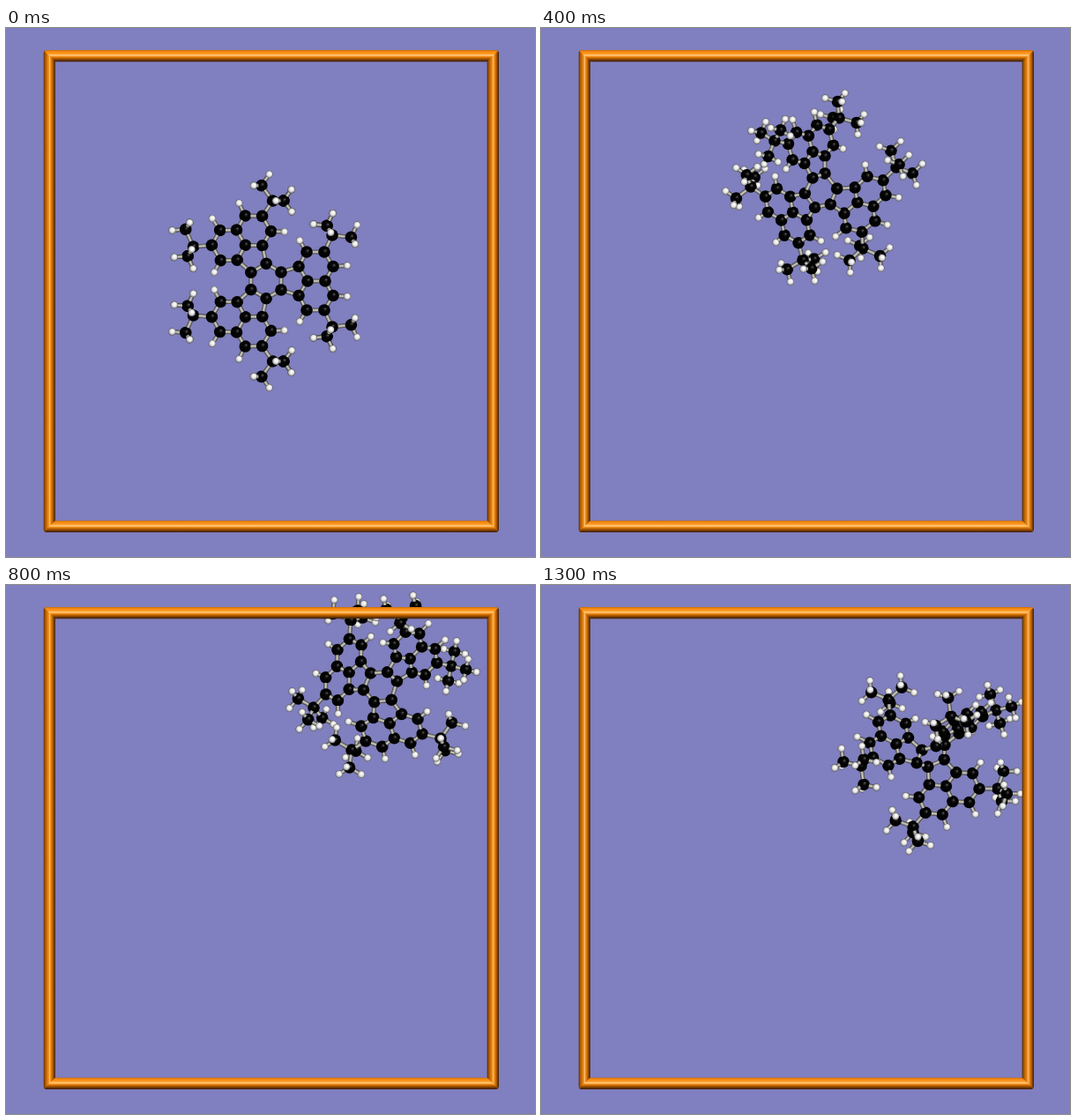
An HTML page with a canvas for the animation above (1.4 s loop, 600 px wide and 600 px high).

```html
<!DOCTYPE html>
<html lang="en">
<head>
<meta charset="utf-8">
<title>Tumbling molecule</title>
<style>
  html, body { margin: 0; width: 100%; height: 100%; overflow: hidden; background: #807fbf; }
  canvas { display: block; width: 100vw; height: 100vh; }
</style>
</head>
<body>
<canvas id="stage" width="600" height="600"></canvas>
<script>
const ctx = document.getElementById('stage').getContext('2d');
const STEP = 100, COUNT = 14;
const TURN = Math.PI * 2 / 3;
const RAD = Math.PI / 180;

// Flat starting pose: three arms around one centre.
function flatPose(cx, cy) {
  const pts = [];
  for (let i = 0; i < 3; i++) {
    const c = Math.cos(i * TURN), s = Math.sin(i * TURN);
    for (const [r, t] of [[17, 0], [75, -52], [75, 52]])
      pts.push(cx + r * c - t * s, cy + r * s + t * c);
  }
  return pts;
}

// Per arm: inner midpoint, then its two outer hubs; spin holds the hub angles.
const poses = [
  { at: 0, pts: flatPose(295, 287), spin: [0, 0, 0, 0, 0, 0] },
  { at: 3, pts: [320,239, 391,222, 315,284, 292,228, 257,298, 237,198, 313,211, 283,139, 364,183],
    spin: [-30, -40, -30, -20, -20, 0] },
  { at: 4, pts: [332,191, 403,158, 365,250, 305,195.5, 297,263, 238,180, 315,167.5, 265,128, 338,102],
    spin: [0, -35, -25, -30, 60, -20] },
  { at: 6, pts: [371.5,129, 440,98, 395,190, 343,130, 330,198, 277,110, 356,103, 304,47, 395,46],
    spin: [-20, -35, -30, -30, 40, 60] },
  { at: 8, pts: [427.5,131.5, 493,174, 392,187, 409.5,109.5, 349,139, 391,40, 438,104, 449,37, 505,92],
    spin: [20, 60, -20, -30, 0, 50] },
  { at: 11, pts: [433,157, 488,207, 386,199, 420,130.5, 353,150, 418,68, 449.5,131.5, 476,66, 517,137],
    spin: [20, 0, -25, -50, 0, 60] },
  { at: 13, pts: [448,202, 518,231, 422,274, 429,194.5, 363,205, 394,130, 453,182, 465,149, 516,142],
    spin: [30, 60, 30, 0, 60, -30] }
];

const add = (a, b, k = 1) => a.map((v, i) => v + b[i] * k);
const dot = (a, b) => a[0] * b[0] + a[1] * b[1] + a[2] * b[2];
const cross = (a, b) => [a[1] * b[2] - a[2] * b[1], a[2] * b[0] - a[0] * b[2], a[0] * b[1] - a[1] * b[0]];
const unit = a => { const l = Math.hypot(...a) || 1; return a.map(v => v / l); };

function poseAt(n) {
  let i = 0;
  while (i < poses.length - 2 && poses[i + 1].at <= n) i++;
  const a = poses[i], b = poses[i + 1], k = (n - a.at) / (b.at - a.at);
  return {
    pts: a.pts.map((v, j) => v + (b.pts[j] - v) * k),
    // the hubs look the same every 120 degrees
    spin: a.spin.map((v, j) => {
      const d = b.spin[j] - v;
      return v + (d - 120 * Math.round(d / 120)) * k;
    })
  };
}

// Turns the three arm points into a projection with depth.
function armAxes(p) {
  const [mx, my, ax, ay, bx, by] = p;
  const u = [((ax + bx) / 2 - mx) / 58, ((ay + by) / 2 - my) / 58, 0];
  const v = [(bx - ax) / 104, (by - ay) / 104, 0];
  const uv = dot(u, v);
  const uz = Math.sqrt(Math.max(0, 1 - dot(u, u)));
  const vz = Math.sqrt(Math.max(0, 1 - dot(v, v)));
  const top = Math.max(uz, vz);
  const low = top > 0.1 ? Math.max(-0.7, Math.min(0.7, -uv / top)) : 0;
  if (uz >= vz) { u[2] = uz; v[2] = low; } else { v[2] = vz; u[2] = low; }
  const w = cross(u, v);
  return ([r, t, h]) => [
    mx + (r - 17) * u[0] + t * v[0] + h * w[0],
    my + (r - 17) * u[1] + t * v[1] + h * w[1],
    r * u[2] + t * v[2] + h * w[2]
  ];
}

function buildMolecule(pose) {
  const atoms = [], bonds = [], cores = [];
  const link = (a, b) => bonds.push([a, b]);

  for (let arm = 0; arm < 3; arm++) {
    const project = armAxes(pose.pts.slice(arm * 6, arm * 6 + 6));
    const atom = (pos, light, from) => {
      const a = { p: project(pos), r: light ? 4.2 : 6.8, stops: light ? LIGHT : DARK };
      atoms.push(a);
      if (from) link(from, a);
      return a;
    };
    const inner = atom([47, 0, 0]), outer = atom([67, 0, 0], false, inner);

    [-1, 1].forEach((s, side) => {
      const core = atom([17, 10 * s, 0]);
      cores.push(core);
      const c1 = atom([37, 16.5 * s, 0], false, core);
      const c2 = atom([46, 33 * s, 0], false, c1);
      const c3 = atom([66, 33 * s, 0], false, c2);
      const c4 = atom([76, 16.5 * s, 0], false, c3);
      link(c1, inner);
      link(c4, outer);
      atom([38, 46 * s, 0], true, c2);
      atom([92, 17.5 * s, 0], true, c4);

      const hubPos = [75, 52 * s, 0], hub = atom(hubPos, false, c3);
      const axis = [0.43, 0.9 * s, 0], flat = [0.9, -0.43 * s, 0];
      for (let m = 0; m < 3; m++) {
        const q = pose.spin[arm * 2 + side] * RAD + m * TURN;
        let d = axis.map(x => x / 3);
        d = add(d, flat, 0.943 * Math.cos(q));
        d = unit(add(d, [0, 0, 1], 0.943 * Math.sin(q)));
        const pos = add(hubPos, d, 21.5), methyl = atom(pos, false, hub);
        const e = unit(add(axis, d, -dot(axis, d))), f = cross(d, e);
        for (let h = 0; h < 3; h++) {
          let end = add(pos, d, 5.2);
          end = add(end, e, 14.5 * Math.cos(h * TURN));
          end = add(end, f, 14.5 * Math.sin(h * TURN));
          atom(end, true, methyl);
        }
      }
    });
  }
  for (let i = 0; i < 6; i++) link(cores[i], cores[(i + 1) % 6]);
  return { atoms, bonds };
}

const DARK = [[0, '#6a6a6a'], [0.16, '#252525'], [0.36, '#050505'], [1, '#000']];
const LIGHT = [[0, '#fff'], [0.45, '#eee'], [0.75, '#bdbdbd'], [1, '#555']];
const ROD = [[4.8, '#3f3f3b'], [3.5, '#85857f'], [1.7, '#c4c4bb']];

function drawAtom({ p: [x, y], r, stops }) {
  const g = ctx.createRadialGradient(x + r * 0.2, y - r * 0.25, 0, x, y, r);
  stops.forEach(([k, c]) => g.addColorStop(k, c));
  ctx.fillStyle = g;
  ctx.beginPath();
  ctx.arc(x, y, r, 0, Math.PI * 2);
  ctx.fill();
}

// The rod shows only between the surfaces of its two balls.
function drawBond(a, b) {
  const dir = unit(add(b.p, a.p, -1));
  const from = add(a.p, dir, a.r * 0.92), to = add(b.p, dir, -b.r * 0.92);
  for (const [width, color] of ROD) {
    ctx.lineWidth = width;
    ctx.strokeStyle = color;
    ctx.beginPath();
    ctx.moveTo(from[0], from[1]);
    ctx.lineTo(to[0], to[1]);
    ctx.stroke();
  }
}

// Box of four lit tubes with mitred corners.
const BOX = { x0: 42.5, y0: 25, x1: 559, y1: 572, w: 13.3 };
const SIDE = [[0, '#4b2400'], [0.12, '#9a5000'], [0.32, '#d87606'], [0.48, '#f79a2c'],
  [0.54, '#ffc880'], [0.6, '#f0901c'], [0.78, '#b86000'], [0.92, '#6a3400'], [1, '#351800']];
const LEVEL = [[0, '#c06a08'], [0.1, '#f08410'], [0.32, '#ff9a20'], [0.46, '#ffd08c'],
  [0.56, '#f48c14'], [0.7, '#b86000'], [0.86, '#6e3800'], [1, '#381a00']];

function tube(stops, gx0, gy0, gx1, gy1, corners) {
  const g = ctx.createLinearGradient(gx0, gy0, gx1, gy1);
  stops.forEach(([k, c]) => g.addColorStop(k, c));
  ctx.fillStyle = g;
  ctx.beginPath();
  corners.forEach(([x, y]) => ctx.lineTo(x, y));
  ctx.fill();
}

function drawBox() {
  const { x0, y0, x1, y1, w } = BOX;
  const xi = x0 + w, yi = y0 + w, xj = x1 - w, yj = y1 - w;
  ctx.save();
  ctx.beginPath();
  ctx.roundRect(x0, y0, x1 - x0, y1 - y0, 4);
  ctx.clip();
  tube(SIDE, x0, 0, xi, 0, [[x0, y0], [xi, y0], [xi, y1], [x0, y1]]);
  tube(SIDE, xj, 0, x1, 0, [[xj, y0], [x1, y0], [x1, y1], [xj, y1]]);
  tube(LEVEL, 0, y0, 0, yi, [[x0, y0], [x1, y0], [xj, yi], [xi, yi]]);
  tube(LEVEL, 0, yj, 0, y1, [[xi, yj], [xj, yj], [x1, y1], [x0, y1]]);
  ctx.restore();
}

function draw(n) {
  ctx.fillStyle = '#807fbf';
  ctx.fillRect(0, 0, 600, 600);
  const { atoms, bonds } = buildMolecule(poseAt(n));
  const parts = [
    ...bonds.map(([a, b]) => ({ z: (a.p[2] + b.p[2]) / 2, paint: () => drawBond(a, b) })),
    ...atoms.map(a => ({ z: a.p[2], paint: () => drawAtom(a) }))
  ];
  parts.sort((a, b) => b.z - a.z).forEach(part => part.paint());
  drawBox();
}

const start = performance.now();
let shown = -1;
function tick() {
  const n = Math.floor((performance.now() - start) / STEP) % COUNT;
  if (n !== shown) draw(shown = n);
  requestAnimationFrame(tick);
}
tick();
</script>
</body>
</html>
```
